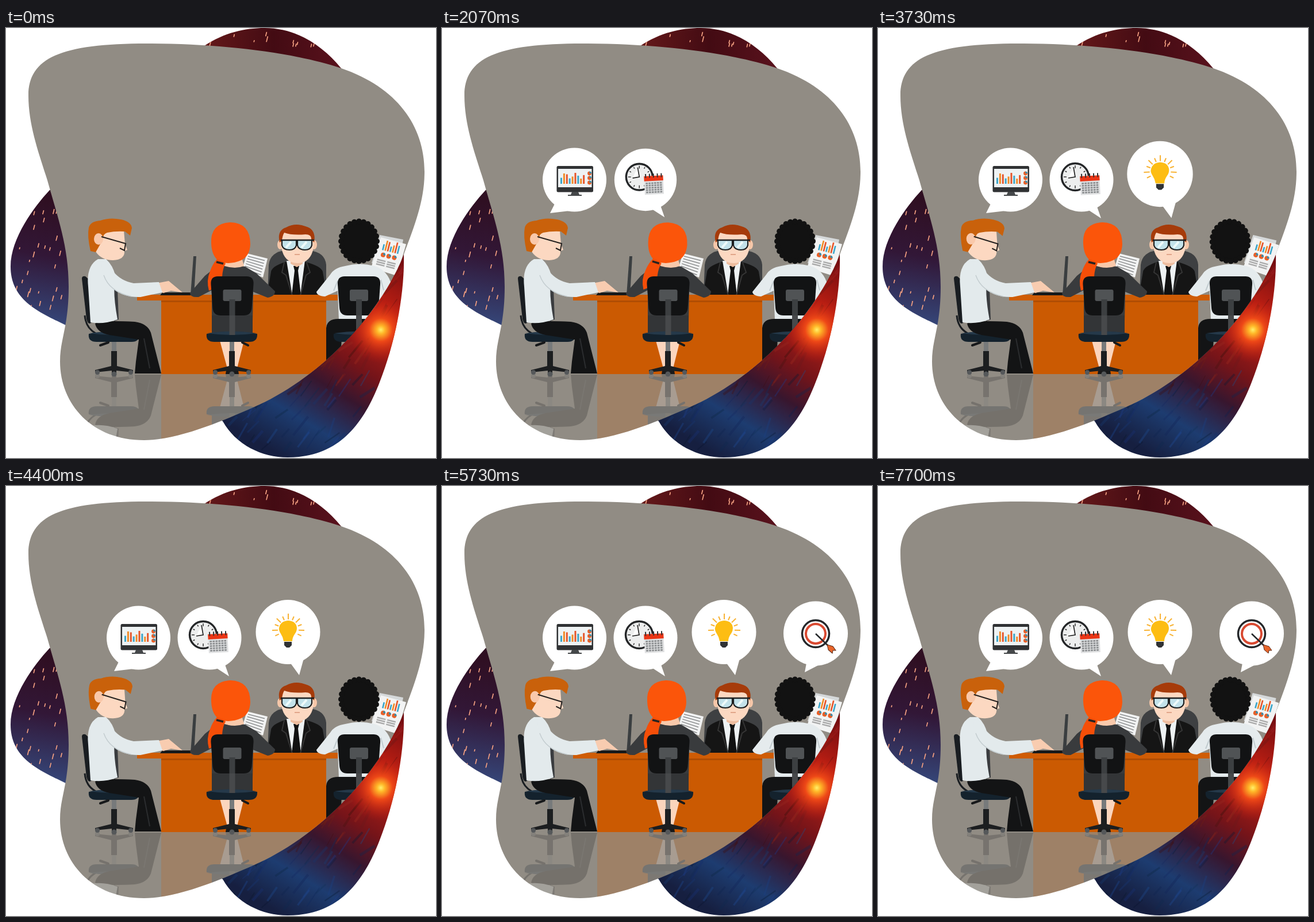
These frames come from a looping animation (748 by 748 pixels, 7.73 s). An HTML page:

```html
<!DOCTYPE html>
<html lang="en">
<head>
<meta charset="utf-8">
<title>Team meeting</title>
<style>
html, body { margin: 0; width: 100%; height: 100%; overflow: hidden; background: #fff; }
svg { display: block; width: 100vw; height: 100vh; }
</style>
</head>
<body>
<svg viewBox="0 0 748 748" fill="none">
<defs>
  <linearGradient id="night" x1="75" y1="300" x2="40" y2="510" gradientUnits="userSpaceOnUse">
    <stop stop-color="#2f0f22"/><stop offset=".45" stop-color="#321737"/><stop offset="1" stop-color="#35477a"/>
  </linearGradient>
  <linearGradient id="dusk">
    <stop stop-color="#66191a"/><stop offset=".5" stop-color="#430b13"/><stop offset="1" stop-color="#5a121d"/>
  </linearGradient>
  <linearGradient id="fire" x1="690" y1="400" x2="480" y2="745" gradientUnits="userSpaceOnUse">
    <stop stop-color="#720b10"/><stop offset=".25" stop-color="#c42213"/><stop offset=".5" stop-color="#751419"/>
    <stop offset=".64" stop-color="#38162e"/><stop offset=".82" stop-color="#1d3c70"/><stop offset="1" stop-color="#161f40"/>
  </linearGradient>
  <radialGradient id="glow">
    <stop stop-color="#fff06a"/><stop offset=".12" stop-color="#ffb728"/><stop offset=".35" stop-color="#ee4817"/>
    <stop offset="1" stop-color="#b81512" stop-opacity="0"/>
  </radialGradient>
  <clipPath id="spaceClip"><path d="M345 31C380 8 415 0 450 0C505 0 550 30 583 70L692 392C694 470 674 555 650 616C620 694 575 747 490 747C445 747 400 725 377 684L104 517C60 495 8 475 8 415C8 365 50 310 75 283Z"/></clipPath>
  <clipPath id="roomClip"><path d="M39 118C39 52 95 27 245 27C370 27 500 42 583 70C680 103 728 170 728 250C728 300 712 340 692 394C650 500 545 610 430 660C380 682 300 717 240 717C150 717 94 655 94 580C94 540 109 520 109 450C109 380 90 330 72 265C58 220 39 170 39 118Z"/></clipPath>
  <g id="base">
    <path d="M-4 546H4V578H-4Z" fill="#777a7b"/>
    <path d="M-5 562H5V588L33 595V599L4 596V604H-4V596L-33 599V595L-5 588Z" fill="#1c1e20"/>
    <g fill="#55585a"><circle cx="-29" cy="599" r="4"/><circle cy="602" r="4.5"/><circle cx="29" cy="599" r="4"/></g>
  </g>
  <g id="seat">
    <path d="M-44 532Q0 524 44 532Q45 546 30 546H-30Q-46 546-44 532Z" fill="#14222d"/>
    <path d="M-43 531Q0 524 43 531Q0 537-43 531Z" fill="#25394a"/>
  </g>
  <g id="back">
    <rect x="-5" y="490" width="10" height="44" fill="#47494b"/>
    <path d="M-25 432H25Q38 432 37 446L34 487Q33 500 20 500H-20Q-33 500-34 487L-37 446Q-38 432-25 432Z" fill="#121314"/>
    <rect x="-16" y="455" width="32" height="20" rx="3" fill="#505355"/>
    <rect x="-5" y="472" width="10" height="28" fill="#3c3f41"/>
  </g>
</defs>

<g clip-path="url(#spaceClip)">
  <rect x="340" width="250" height="100" fill="url(#dusk)"/>
  <rect y="270" width="120" height="260" fill="url(#night)"/>
  <rect x="370" y="380" width="330" height="368" fill="url(#fire)"/>
  <g id="streaks"></g>
  <circle cx="652" cy="525" r="58" fill="url(#glow)"/>
  <g id="sparks" stroke="#f4a081" stroke-width="1.7" stroke-linecap="round"></g>
</g>

<g clip-path="url(#roomClip)">
  <rect width="748" height="748" fill="#918c84"/>
  <use href="#scene" transform="matrix(1 0 0 -1 0 1204)" opacity=".22"/>
  <g id="scene">
    <!-- facing man -->
    <path d="M455 465L457 412Q460 389 486 387H528Q555 390 557 412V465Z" fill="#3e4042"/>
    <path d="M454 465L461 424Q463 414 486 407H521Q548 414 551 424L558 465Z" fill="#151515"/>
    <path d="M488 405H520L512 465H498Z" fill="#eef2f3"/>
    <path d="M500 414H510L508 422L513 465H497L502 422Z" fill="#111"/>
    <path d="M484 408L480 425L487 430L498 465M523 408L529 425L522 430L512 465" stroke="#353535" stroke-width="2"/>
    <path d="M495 398H516V410L506 416L495 410Z" fill="#eebd9f"/>
    <g fill="#f6c7a9"><ellipse cx="477" cy="377" rx="5" ry="8"/><ellipse cx="536" cy="377" rx="5" ry="8"/></g>
    <path d="M479 358Q507 346 534 358L535 382Q530 409 507 409Q484 409 479 382Z" fill="#fcd8c1"/>
    <path d="M476 373Q471 352 487 347Q503 338 521 345Q540 350 536 373L531 368Q532 359 521 359Q497 361 484 356Q481 361 480 370Z" fill="#a63b0a"/>
    <g fill="#c3e2ea" stroke="#1d1f20" stroke-width="2.200">
      <path id="lens" d="M480 369H505V378Q503 386 493 386Q482 386 480 378Z"/><use href="#lens" x="27"/>
    </g>
    <path d="M478 369H536" stroke="#1d1f20" stroke-width="2.500"/>
    <path d="M487 382L496 372M514 382L523 372" stroke="#eefafa" stroke-width="4"/>
    <path d="M502 394H511" stroke="#d99477" stroke-width="1.500"/>

    <!-- desk -->
    <rect x="270" y="472" width="287" height="130" fill="#cb5a02"/>
    <rect x="270" y="474" width="287" height="3" fill="#b04d03"/>
    <rect x="228" y="464" width="349" height="10" fill="#cf5c05"/>

    <!-- typist -->
    <path d="M132 436Q132 431 138 432L145 438L149 512Q143 518 140 506Z" fill="#191d21"/>
    <path d="M137 500Q139 522 156 531" stroke="#191d21" stroke-width="3"/>
    <use href="#base" x="188"/><use href="#seat" x="188"/>
    <path d="M178 547L164 552" stroke="#17191b" stroke-width="4" stroke-linecap="round"/>
    <path d="M155 514Q165 508 224 511Q246 514 252 530L270 601H224L226 580L231 542L180 534Q158 530 155 514Z" fill="#131415"/>
    <path d="M240 540L250 592" stroke="#2b2d2f" stroke-width="2"/>
    <path d="M188 445L194 454L196 507L188 510Z" fill="#3a3c3f"/>
    <path d="M160 402H174Q186 413 190 430Q185 460 194 507Q170 516 147 512L143 450Q139 414 160 402Z" fill="#e3eaec"/>
    <path d="M272 460H323V465H268Z" fill="#17191a"/>
    <path d="M326 397H331L327 465H321Z" fill="#3a3e40"/>
    <path d="M262 444L283 440L307 460L287 457L274 461L264 458Z" fill="#f8ccb0"/>
    <path d="M166 410Q179 408 187 424Q200 440 222 444L266 442L272 460L234 468Q205 469 187 454Q166 437 166 410Z" fill="#e3eaec"/>
    <path d="M170 430Q180 459 218 467" stroke="#c4cdd0" stroke-width="1.500"/>
    <g id="typistHead">
      <path d="M155 355L205 352L207 376L211 386L206 388Q207 403 186 404Q166 404 156 389Z" fill="#fcd8c1"/>
      <path d="M147 388Q141 362 144 347Q147 336 164 335Q180 329 200 333Q218 337 219 348L216 361L207 354Q190 353 176 356Q169 358 169 366L164 376L156 390Z" fill="#c9610b"/>
      <ellipse cx="161" cy="367" rx="8" ry="10" fill="#f9c8aa"/>
      <path d="M166 363L208 375L206 387L198 383" stroke="#24211f" stroke-width="2"/>
    </g>

    <!-- woman -->
    <path d="M372 544H414L402 592H396L394 558L392 592H385Z" fill="#fbd5bd"/>
    <path d="M384 590H403L405 602H382Z" fill="#191919"/>
    <path d="M419 392L455 401L447 434L411 419Z" fill="#f2f3f3"/>
    <g id="notes" stroke="#8b8d8e" stroke-width="1.500"></g>
    <path d="M365 416Q390 409 416 415L436 427L468 458Q468 467 455 469L430 459L429 510H358V456L335 468Q320 469 320 461L346 431Z" fill="#393b3d"/>
    <rect x="358" y="500" width="71" height="32" fill="#333537"/>
    <path d="M380 403H411L414 414Q399 420 380 414Z" fill="#f8c9ab"/>
    <g id="womanHead">
      <path d="M357 375Q355 340 390 338Q425 339 425 376Q424 397 409 404Q391 412 373 407Q358 399 357 375Z" fill="#fb550a"/>
      <path d="M367 402Q379 405 382 410Q377 417 376 433Q374 449 353 457Q348 439 355 423Q359 411 367 402Z" fill="#f54e08"/>
      <path d="M366 407L378 410" stroke="#272321" stroke-width="3.500"/>
    </g>
    <use href="#base" x="393"/><use href="#seat" x="393"/><use href="#back" x="393.500"/>
    <path d="M411 547L421 552" stroke="#17191b" stroke-width="4" stroke-linecap="round"/>

    <!-- man with report -->
    <g id="report">
      <path d="M650 360L691 368L681 421L636 409Z" fill="#d5d8d9"/>
      <path d="M652 364L696 376L680 431L635 417Z" fill="#f2f3f3"/>
      <g id="reportChart" transform="translate(654 386) rotate(14)"></g>
    </g>
    <path d="M590 414Q615 407 641 414Q664 421 671 448Q669 465 652 469L650 508H579L577 457L555 467Q541 466 540 459L564 429Q571 417 590 414Z" fill="#e5ebed"/>
    <path d="M577 440L570 457M652 438L657 456" stroke="#c1cbcf" stroke-width="2"/>
    <path d="M557 522Q558 506 578 506H650V540H584L580 602H557Z" fill="#131415"/>
    <g id="curls" fill="#121212"></g>
    <use href="#base" x="614"/><use href="#seat" x="614"/><use href="#back" x="614"/>
  </g>

  <g id="bubbles" fill="#fff">
    <g><circle cx="230.500" cy="264" r="55.500"/><path d="M198 302L188 322L222 318Z"/>
      <rect x="199.500" y="240" width="63.500" height="45.500" rx="2.500" fill="#303234"/><rect x="202" y="245" width="58.500" height="32" fill="#eef2f3"/>
      <path d="M226 285H237L239 290H243V292H219V290H224Z" fill="#45484a"/><g id="screenChart" transform="translate(206 271)"></g></g>
    <g><circle cx="354" cy="264" r="55.500"/><path d="M365 316L388 331L379 305Z"/>
      <circle cx="343" cy="259" r="23.500" fill="#edeeee" stroke="#242628" stroke-width="3.500"/><g id="ticks" stroke="#333" stroke-width="1.500"></g>
      <path d="M340 242L343 259L331 261" stroke="#222" stroke-width="1.700"/>
      <g transform="rotate(-3 369 273)"><rect x="352" y="257" width="34" height="33" fill="#dfe0e1"/><rect x="352" y="257" width="34" height="9" fill="#eb3515"/><g id="calendar"></g></g></g>
    <g><circle cx="490.500" cy="254" r="56"/><path d="M494 307L510 329L518 300Z"/>
      <g id="rays" stroke="#f8b334" stroke-width="2"></g>
      <path d="M483 270Q482 263 478 257Q474 251 475 247Q477 235 491 234Q505 235 506 247Q506 253 502 258Q498 264 498 270Z" fill="#fdbd13"/>
      <path d="M484 271H497V277L493 281H488L484 277Z" fill="#303234"/></g>
    <g><circle cx="650" cy="256.500" r="56"/><path d="M634 308L631 324L658 310Z"/>
      <circle cx="650" cy="257" r="23.500" stroke="#24272a" stroke-width="3.500"/>
      <g id="rings" stroke="#d94a32" stroke-width="4"></g>
      <path d="M650 257L677 283" stroke="#25282a" stroke-width="2.500"/><path d="M670 276L680 279L685 286L680 286L679 291L672 285Z" fill="#e9652a" stroke="#5a2a18"/></g>
  </g>
</g>
</svg>
<script>
const LOOP = 7730;
const $ = id => document.getElementById(id);

let seed = 17;
const random = () => (seed = seed * 16807 % 2147483647) / 2147483647;
const between = (a, b) => a + (b - a) * random();
const repeat = (n, draw) => Array.from({ length: n }, (_, i) => draw(i)).join('');
const line = (x, y, dx, dy, attrs = '') => `<path d="M${x} ${y}l${dx} ${dy}" ${attrs}/>`;
const dot = (x, y, r, attrs = '') => `<circle cx="${x}" cy="${y}" r="${r}" ${attrs}/>`;

// Red streaks fade to blue towards the bottom
$('streaks').innerHTML = repeat(170, () => {
  const x = between(380, 690), y = between(400, 745), depth = y + x * .2 - 740;
  const hue = depth > 0 ? between(212, 226) : between(-4, 10);
  const color = `hsl(${hue} 65% ${between(10, depth > 0 ? 36 : 42)}%)`;
  return line(x, y, between(10, 26), -between(14, 34), `stroke="${color}" stroke-width="${between(1, 5)}" opacity=".35"`);
});

const sparks = (n, x0, x1, y0, y1) => repeat(n, () => {
  const length = between(2, 9);
  return line(between(x0, x1), between(y0, y1), -length * .25, length);
});
$('sparks').innerHTML = sparks(30, 15, 100, 310, 490) + sparks(14, 355, 540, 2, 36);

const bars = (n, step) => repeat(n, i => {
  const height = 14 + 5 * Math.sin(i * 1.7 - .8);
  return line((i + .3) * step, 0, 0, -height, `stroke="${['#3aa5c9', '#f08a24', '#e65328'][i % 3]}" stroke-width="${step * .6}"`);
});
const pie = (x, y, r) => dot(x, y, r, 'fill="#e76029"') +
  `<path d="M${x} ${y}v${-r}a${r} ${r} 0 0 1 ${r} ${r}z" fill="#348fae"/>`;
$('screenChart').innerHTML = bars(9, 4.9) + repeat(3, i => pie(50.5, -18 + 8 * i, 3.4));
$('reportChart').innerHTML = bars(7, 4.4) + repeat(3, i => pie(4 + 10 * i, 8, 4)) +
  repeat(6, i => line(i % 2 * 18 - 4, 18 + 4 * (i >> 1), 15, 0, 'stroke="#aaa" stroke-width="2.4"'));
$('notes').innerHTML = repeat(6, i => line(421 - i * 1.3, 397 + i * 4.3, 29, 7.5 + i * .7));

$('curls').innerHTML = '<ellipse cx="614" cy="371" rx="33" ry="36"/>' + repeat(24, i => {
  const angle = i * Math.PI / 12;
  return dot(614 + 31 * Math.cos(angle), 371 + 34.5 * Math.sin(angle), 5);
});
$('ticks').innerHTML = repeat(12, i => `<path d="M343 239v${i % 3 ? 3 : 5}" transform="rotate(${i * 30} 343 259)"/>`);
$('calendar').innerHTML = repeat(5, i => line(355 + i * 7, 253, 0, 7, 'stroke="#303234" stroke-width="2"')) +
  repeat(30, i => `<rect x="${354.5 + i % 6 * 5}" y="${268.5 + (i / 6 | 0) * 4}" width="3.7" height="2.8" fill="#8b8e90"/>`);
$('rays').innerHTML = repeat(11, i =>
  `<path d="M491 232v${i % 2 ? -10 : -7}" transform="rotate(${(i - 5) * 23} 491 250)"/>`);
$('rings').innerHTML = repeat(3, i => dot(650, 257, 2 + i * 7.5));

const spring = t => t <= 0 ? 0 : 1 - Math.exp(-t / 81) * Math.cos(t * Math.PI / 150);
const ease = (t, from, to) => {
  const p = Math.min(1, Math.max(0, (t - from) / (to - from)));
  return p * p * (3 - 2 * p);
};
const bump = (t, peak, reach) => ease(t, peak - reach, peak) - ease(t, peak, peak + reach);
const turn = (id, angle, x, y) => $(id).setAttribute('transform', `rotate(${angle} ${x} ${y})`);

const starts = [350, 1770, 3520, 4745];
const bubbles = [...$('bubbles').children].map((node, i) => {
  const circle = node.firstElementChild;
  return { node, start: starts[i], x: circle.cx.baseVal.value, y: circle.cy.baseVal.value };
});

function draw(t) {
  for (const { node, start, x, y } of bubbles) {
    const scale = spring(t - start);
    node.setAttribute('visibility', scale ? 'visible' : 'hidden');
    node.setAttribute('transform', `translate(${x} ${y}) scale(${scale}) translate(${-x} ${-y})`);
  }
  const lean = bump(t, 3730, 700) + ease(t, 6600, LOOP) * .7;
  turn('typistHead', ease(t, 2700, 3700), 177, 405);
  turn('womanHead', 3 * bump(t, 2070, 420), 388, 405);
  turn('curls', -2 * lean, 614, 411);
  turn('report', 2 * lean, 650, 430);
}

const begin = performance.now();
function tick() {
  draw((performance.now() - begin) % LOOP);
  requestAnimationFrame(tick);
}
tick();
</script>
</body>
</html>
```
